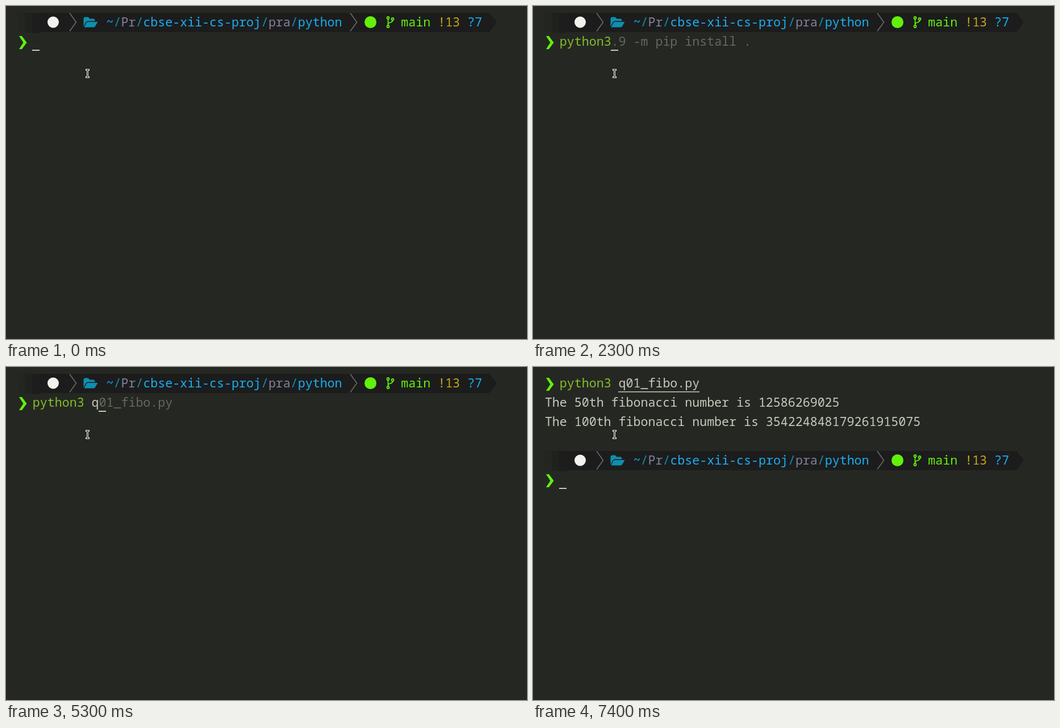
Recreate the animation shown at these times as an HTML page with a canvas. Size 917x587 px, loop 8000 ms.

```html
<!DOCTYPE html>
<html lang="en">
<head>
<meta charset="utf-8">
<title>Terminal</title>
<style>
  html, body { margin: 0; width: 100%; height: 100%; overflow: hidden; background: #252822; }
  canvas { display: block; }
</style>
</head>
<body>
<canvas id="stage" width="917" height="587"></canvas>
<script>
const ctx = document.getElementById('stage').getContext('2d');
const LOOP = 8000, LEFT = 20.9, TOP = 12, CELL = 12.97, LINE = 34;
const C = {
  bg: '#252822', bar: '#1c1c1c', sep: '#6e6e6c', text: '#c8c8be', hint: '#65675f',
  command: '#86bd2c', unknown: '#d01c58', ok: '#62f00c', blue: '#18aff2',
  teal: '#0e8fb0', short: '#82829c', yellow: '#c9a618', white: '#f2f2ee'
};

const RUN = ' run_chat_info.py', PIP = '.9 -m pip install .', APP = 'manage.py startapp profiles';

// [time, command, argument, suggestion, cursor visible, colour of command]
const steps = [
  [0, '', '', '', 1],
  [500, '', '', '', 0],
  [900, 'p', '', 'ylint q01_fibo.py', 1, C.unknown],
  [1000, 'py', '', 'lint q01_fibo.py', 1],
  [1200, 'pyt', '', 'hon' + RUN, 1, C.unknown],
  [1300, 'pyth', '', 'on' + RUN, 1, C.unknown],
  [1400, 'pytho', '', 'n' + RUN, 1, C.unknown],
  [1500, 'python', '', RUN, 1],
  [2200, 'python3', '', '', 1],
  [2300, 'python3', '', PIP, 1],
  [2800, 'python', '', RUN, 1],
  [3100, 'python3', '', '', 1],
  [3200, 'python3', '', PIP, 1],
  [3700, 'python3 ', '', APP, 1],
  [4000, 'python3 ', '', APP, 0],
  [4600, 'python3 ', '', APP, 1],
  [5200, 'python3 ', '', APP, 0],
  [5300, 'python3 ', 'q', '01_fibo.py', 1],
  [6000, 'python3 ', 'q01_fibo.py ', '', 1],
  [6600, 'python3 ', 'q01_fibo.py ', '', 0]
];

const colX = col => LEFT + col * CELL;
const rowY = row => TOP + row * LINE;

function rect(x, y, w, h, color) {
  ctx.fillStyle = color;
  ctx.fillRect(x, y, w, h);
}

function text(str, col, row, color) {
  ctx.fillStyle = color;
  ctx.fillText(str, colX(col), rowY(row) + 24);
  return col + str.length;
}

function trace(points) {
  ctx.beginPath();
  points.forEach(([x, y]) => ctx.lineTo(x, y));
}

function polygon(points, color) {
  trace(points);
  ctx.fillStyle = color;
  ctx.fill();
}

function polyline(points, color, width) {
  trace(points);
  ctx.strokeStyle = color;
  ctx.lineWidth = width;
  ctx.stroke();
}

function disc(x, y, r, color) {
  ctx.beginPath();
  ctx.arc(x, y, r, 0, 2 * Math.PI);
  ctx.fillStyle = color;
  ctx.fill();
}

function underline(from, to, row, height) {
  const x = Math.floor(colX(from));
  rect(x, rowY(row) + 31, Math.floor(colX(to)) - x, height, C.text);
}

const cursor = (col, row) => underline(col, col + 1, row, 2);

function folder(x, y) {
  polygon([[x, y + 17], [x, y + 2], [x + 2, y], [x + 8, y], [x + 11, y + 3],
    [x + 18, y + 3], [x + 20, y + 5], [x + 20, y + 7], [x + 7, y + 7], [x + 4, y + 9]], C.teal);
  polygon([[x + 1, y + 18], [x + 5, y + 10], [x + 7, y + 8.5], [x + 25, y + 8.5],
    [x + 20, y + 17], [x + 18, y + 18]], C.teal);
}

function branch(x, y) {
  ctx.lineWidth = 1.8;
  ctx.strokeStyle = C.ok;
  for (const [dx, dy] of [[3, 3], [11, 5], [3, 18]]) {
    ctx.beginPath();
    ctx.arc(x + dx, y + dy, 2, 0, 2 * Math.PI);
    ctx.stroke();
  }
  ctx.beginPath();
  ctx.moveTo(x + 3, y + 5);
  ctx.lineTo(x + 3, y + 16);
  ctx.moveTo(x + 11, y + 7);
  ctx.bezierCurveTo(x + 11, y + 13, x + 3, y + 9, x + 3, y + 15);
  ctx.stroke();
}

function chevron(x, y) {
  polyline([[x, y + 0.5], [x + 11.5, y + 16.5], [x, y + 32.5]], C.sep, 1.5);
}

function statusBar(row) {
  const y = rowY(row), mid = y + 16.5, end = colX(64);
  // shaded lead-in, denser towards the bar
  [0.25, 0.5, 0.78].forEach((alpha, i) => {
    ctx.globalAlpha = alpha;
    for (let dy = 0; dy < LINE; dy += 3) rect(colX(i), y + dy, CELL, i + 1, C.bar);
    ctx.globalAlpha = alpha * 0.6;
    rect(colX(i), y, CELL, LINE, C.bar);
  });
  ctx.globalAlpha = 1;
  polygon([[colX(3), y], [end, y], [end + 13, mid], [end, y + LINE], [colX(3), y + LINE]], C.bar);
  disc(83, mid, 10, C.white);
  chevron(112, y);
  folder(136.5, y + 7.5);
  let col = 12;
  for (const [str, color] of [['~', C.blue], ['/', C.teal], ['Pr', C.short], ['/', C.teal],
    ['cbse-xii-cs-proj', C.blue], ['/', C.teal], ['pra', C.short], ['/', C.teal], ['python', C.blue]]) {
    col = text(str, col, row, color);
  }
  chevron(606, y);
  disc(641.5, mid, 10.5, C.ok);
  branch(669.5, y + 6);
  text('main', 52, row, C.ok);
  text('!13', 57, row, C.yellow);
  text('?7', 61, row, C.blue);
}

function prompt(row) {
  const y = rowY(row) + 7;
  polygon([[23, y], [28, y], [36.5, y + 11.5], [28, y + 23], [23, y + 23], [30.5, y + 11.5]], C.ok);
}

function commandLine(row, [, cmd, arg, hint, visible, color = C.command]) {
  prompt(row);
  const argCol = text(cmd, 2, row, color);
  const end = text(arg, argCol, row, C.text);
  text(hint, end, row, C.hint);
  const name = arg.trim();
  if (name.length > 1) underline(argCol, argCol + name.length, row, 1.5);
  if (visible) cursor(end, row);
}

function pointer() {
  const draw = (color, width) => {
    polyline([[143.5, 112.5], [143.5, 125.5]], color, width);
    for (const y of [112.5, 125.5]) polyline([[141.5, y], [145.5, y]], color, width);
  };
  ctx.lineCap = 'square';
  draw(C.white, 3);
  draw('#111', 1);
  ctx.lineCap = 'butt';
}

function render(t) {
  rect(0, 0, 917, 587, C.bg);
  ctx.font = '21.617px "Noto Sans Mono", "DejaVu Sans Mono", monospace';
  if (t < 7300) {
    statusBar(0);
    commandLine(1, steps.findLast(step => step[0] <= t));
  } else {
    commandLine(0, [0, 'python3 ', 'q01_fibo.py', '', 0]);
    if (t < 7400) {
      cursor(0, 1);
    } else {
      text('The 50th fibonacci number is 12586269025', 0, 1, C.text);
      text('The 100th fibonacci number is 354224848179261915075', 0, 2, C.text);
      statusBar(4);
      commandLine(5, steps[0]);
    }
  }
  pointer();
}

const start = performance.now();
function tick() {
  render((performance.now() - start) % LOOP);
  requestAnimationFrame(tick);
}
tick();
</script>
</body>
</html>
```
